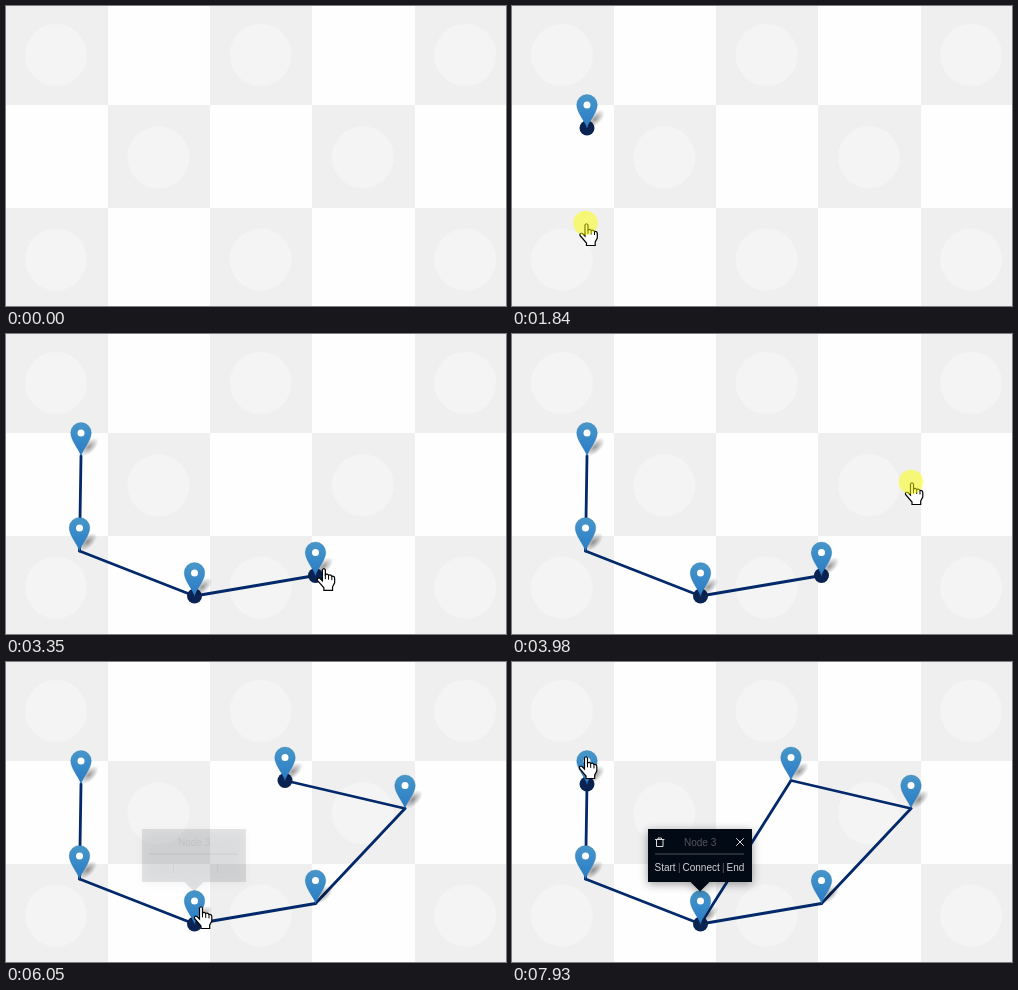
An HTML page with a canvas for the animation above (7990 ms loop, 500 by 300 pixels).

```html
<!DOCTYPE html>
<html lang="en">
<head>
<meta charset="utf-8">
<title>Route editor</title>
<style>
  html, body { margin: 0; width: 100%; height: 100%; overflow: hidden; background: #fefefe; }
  canvas { display: block; }
</style>
</head>
<body>
<canvas id="stage" width="500" height="300"></canvas>
<script>
const ctx = document.getElementById('stage').getContext('2d');
const LOOP = 7990;
const NAVY = '#03296a';

// Each node: position, time it is placed, intervals in which its dot shows.
const nodes = [
  { x: 75, y: 122, at: 1200, dot: [[1200, 2480], [7925, LOOP]] },
  { x: 73.5, y: 217, at: 1870, dot: [[1870, 3220]] },
  { x: 188.5, y: 262, at: 2480, dot: [[2480, 4060], [5980, LOOP]] },
  { x: 309.5, y: 241.5, at: 3220, dot: [[3220, 4720]] },
  { x: 399, y: 146.5, at: 4060, dot: [[4060, 5980]] },
  { x: 279, y: 118.5, at: 4720, dot: [[4720, 7925]] }
];
const CONNECT_AT = 6850;
const POPUP_AT = 6000;
const clicks = [[1010, 1190], [1730, 1870], [2340, 2480], [2940, 3070],
                [3920, 4060], [4570, 4720], [7860, 7925]];

// Cursor stops: time, x, y, sag of the path leading there.
const stops = [
  [460, 261, 268], [1000, 75, 122], [1280, 75, 122], [1680, 73.5, 217],
  [1930, 73.5, 217], [2200, 188, 262], [2580, 188, 262], [2870, 309, 242, 4],
  [3240, 309, 242], [3850, 399, 148], [4080, 399, 148], [4520, 279, 118],
  [5080, 279, 118], [5850, 194, 244], [6250, 194, 244], [6640, 191, 206],
  [6850, 191, 206], [6980, 185, 191], [7140, 185, 191], [7600, 73, 94]
];

const pinShape = new Path2D('M0 0C-2-7-10.3-15-10.3-23.2A10.3 10.3 0 0 1 10.3-23.2C10.3-15 2-7 0 0Z');
const handShape = new Path2D('M-1.5 2Q0-.5 1.5 2V7Q3.5 5.5 4.7 7.5Q7 6.5 8 8.5Q10.5 8 10.8 10.5V15L8.7 19V22.5H0V20L-6.5 12.5Q-7 9.5-4 10.5L-1.5 13Z');
const fingers = new Path2D('M1.5 7V11M4.7 7.5V11.5M8 8.5V12');
const binIcon = new Path2D('M143.5 177.5H152M146 177V176H149.5V177M144.5 178V184.5H151V178');
const closeIcon = new Path2D('M224.5 176.5L231.5 183.5M231.5 176.5L224.5 183.5');

const within = (t, spans) => spans.some(([from, to]) => t >= from && t < to);

function disc(x, y, r, fill) {
  ctx.fillStyle = fill;
  ctx.beginPath();
  ctx.arc(x, y, r, 0, 7);
  ctx.fill();
}

function strokePath(path, color, width) {
  ctx.strokeStyle = color;
  ctx.lineWidth = width;
  ctx.stroke(path);
}

function drawBoard() {
  const size = 102.3;
  ctx.fillStyle = '#fefefe';
  ctx.fillRect(0, 0, 500, 300);
  for (let row = 0; row < 3; row++) {
    for (let col = row % 2; col < 5; col += 2) {
      const left = Math.floor(col * size), top = Math.floor(row * size - 2.5);
      const right = Math.floor((col + 1) * size), bottom = Math.floor((row + 1) * size - 2.5);
      ctx.fillStyle = '#efefef';
      ctx.fillRect(left, top, right - left, bottom - top);
      disc(50 + col * size, 49 + row * size, 31, '#f4f4f4');
    }
  }
}

function drawLine(a, b) {
  ctx.strokeStyle = NAVY;
  ctx.lineWidth = 2.8;
  ctx.lineCap = 'round';
  ctx.beginPath();
  ctx.moveTo(a.x, a.y);
  ctx.lineTo(b.x, b.y);
  ctx.stroke();
}

function drawPin({ x, y }) {
  ctx.save();
  ctx.translate(x, y);

  ctx.save();
  ctx.translate(8, -9);
  ctx.rotate(-0.75);
  ctx.scale(1, 0.5);
  const shade = ctx.createRadialGradient(0, 0, 0, 0, 0, 12);
  shade.addColorStop(0, 'rgba(0,0,0,.4)');
  shade.addColorStop(1, 'rgba(0,0,0,0)');
  disc(0, 0, 12, shade);
  ctx.restore();

  const body = ctx.createLinearGradient(0, -33, 0, 0);
  body.addColorStop(0, '#4797c9');
  body.addColorStop(1, '#297bc6');
  ctx.fillStyle = body;
  ctx.fill(pinShape);
  strokePath(pinShape, 'rgba(35,105,160,.35)', 0.8);
  disc(0, -23, 3.5, '#fff');
  ctx.restore();
}

function label(text, x, y, color) {
  ctx.fillStyle = color;
  ctx.fillText(text, x, y);
}

function drawPopup(t) {
  ctx.save();
  ctx.globalAlpha = Math.min(1, (t - POPUP_AT) / 500);
  ctx.fillStyle = '#020b15';
  ctx.shadowColor = 'rgba(0,0,0,.4)';
  ctx.shadowBlur = 10;
  ctx.shadowOffsetY = 2;
  ctx.beginPath();
  ctx.rect(136, 167, 104, 53);
  ctx.moveTo(178, 219.5);
  ctx.lineTo(198, 219.5);
  ctx.lineTo(188, 229.5);
  ctx.fill();
  ctx.shadowColor = 'transparent';

  ctx.fillStyle = '#4b5055';
  ctx.fillRect(143, 191.5, 89, 1);
  strokePath(binIcon, '#ddd', 1);
  strokePath(closeIcon, '#ddd', 1);
  ctx.font = '10px "Liberation Sans", Arial, sans-serif';
  label('Node 3', 172, 184, '#50555a');
  label('Start', 142.5, 209, '#d2d4d6');
  label('|', 166, 209, '#5a5f64');
  label('Connect', 170.5, 209, t > 6600 && t < 7925 ? '#fff' : '#d2d4d6');
  label('|', 210, 209, '#5a5f64');
  label('End', 214.5, 209, '#d2d4d6');
  ctx.restore();
}

function cursorAt(t) {
  const next = stops.findIndex(stop => stop[0] > t);
  if (next < 0) return stops[stops.length - 1].slice(1, 3);
  const [t0, x0, y0] = stops[next - 1];
  const [t1, x1, y1, sag = 0] = stops[next];
  const u = (t - t0) / (t1 - t0), e = u * u * (3 - 2 * u);
  return [x0 + (x1 - x0) * e, y0 + (y1 - y0) * e + sag * Math.sin(Math.PI * u)];
}

function drawCursor(t) {
  const [x, y] = cursorAt(t);
  const overPin = nodes.some(n => t >= n.at - 90 && Math.abs(x - n.x) < 11 && y > n.y - 34 && y < n.y + 2);
  const overPopup = t > POPUP_AT && x > 136 && x < 240 && y > 167 && y < 220;
  if (overPin || overPopup) {
    ctx.save();
    ctx.translate(x + 1, y);
    ctx.fillStyle = '#fff';
    ctx.fill(handShape);
    strokePath(handShape, '#000', 1.2);
    strokePath(fingers, '#000', 1);
    ctx.restore();
  } else {
    const cx = Math.round(x), cy = Math.round(y);
    ctx.fillStyle = '#000';
    ctx.fillRect(cx - 1, cy - 12, 2, 24);
    ctx.fillRect(cx - 12, cy - 1, 24, 2);
  }
  if (within(t, clicks)) disc(x, y, 12.3, 'rgba(255,255,0,.5)');
}

function draw(t) {
  drawBoard();
  const placed = nodes.filter(n => t >= n.at);
  placed.slice(1).forEach((n, i) => drawLine(placed[i], n));
  if (t >= CONNECT_AT) drawLine(nodes[2], nodes[5]);
  nodes.filter(n => within(t, n.dot)).forEach(n => disc(n.x, n.y, 7.5, '#0a2353'));
  placed.forEach(drawPin);
  if (t > POPUP_AT) drawPopup(t);
  if (t >= stops[0][0]) drawCursor(t);
}

const start = performance.now();
function tick() {
  draw((performance.now() - start) % LOOP);
  requestAnimationFrame(tick);
}
tick();
</script>
</body>
</html>
```
